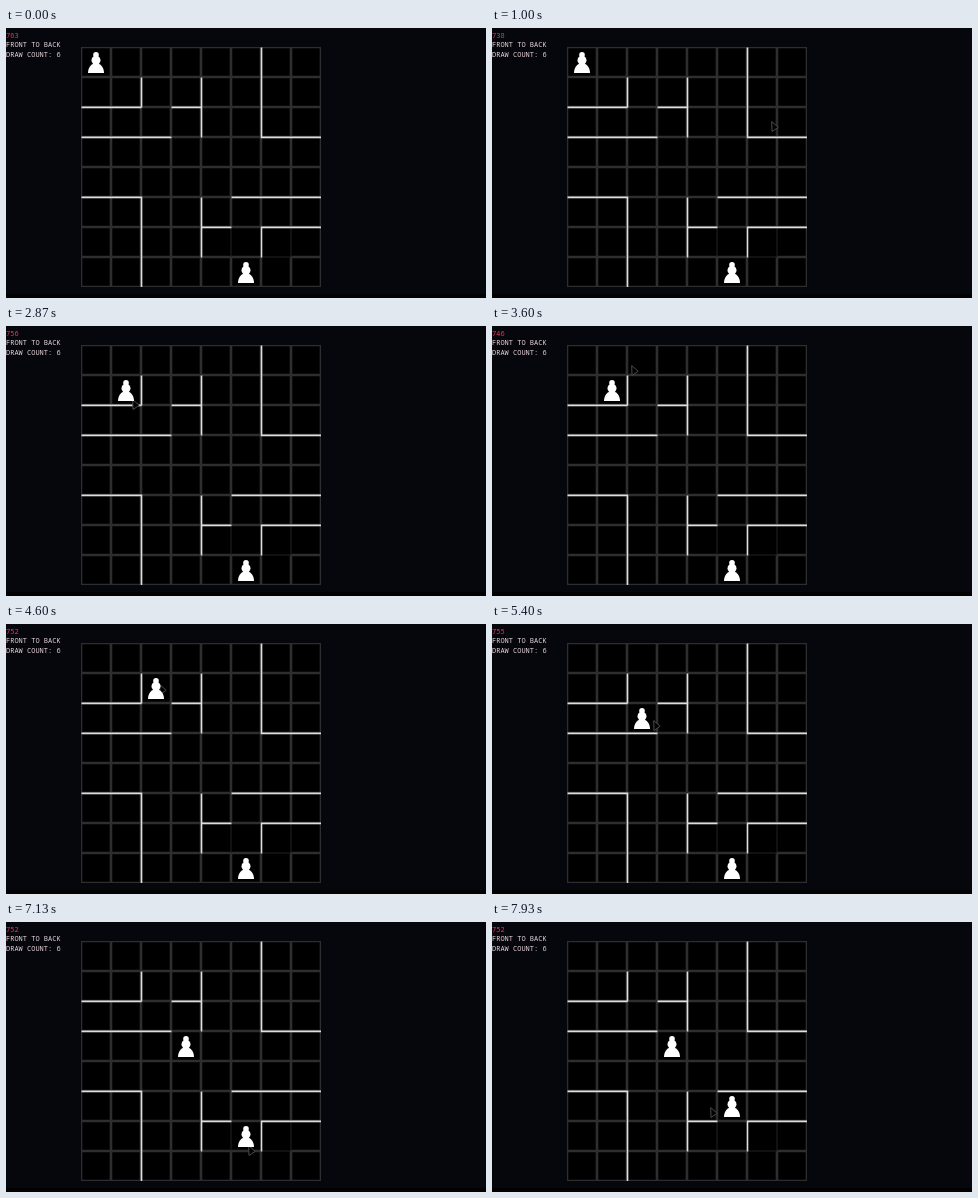
Write an HTML page that moves like this. It is 480x270 px and loops after 8000 ms.

```html
<!DOCTYPE html>
<html lang="en">
<head>
<meta charset="utf-8">
<title>Board</title>
<style>
  html, body { margin: 0; width: 100%; height: 100%; overflow: hidden; background: #06070c; }
  svg { display: block; width: 480px; height: 270px; }
  text { font: 500 7px "Noto Sans Mono", "DejaVu Sans Mono", monospace; fill: #e6d3d9; white-space: pre; }
  #count { fill: #f5305f; }
  path { vector-effect: non-scaling-stroke; }
  .line { stroke: #2e2e2e; stroke-width: 2.6; fill: none; }
  .thin { stroke: #222; stroke-width: 1; fill: none; }
  .wall { stroke: #dedede; stroke-width: 1.6; fill: none; }
  #cursor { fill: #000; stroke: #4c4c4c; stroke-width: 1; stroke-linejoin: round; }
  .pawn { fill: #fff; }
</style>
</head>
<body>
<svg viewBox="0 0 480 270">
  <defs>
    <clipPath id="board"><rect x="75" y="19" width="240" height="240"/></clipPath>
    <g id="pawn">
      <circle cy="-7.6" r="2.8"/>
      <circle cy="-2.3" r="4.5"/>
      <path d="M-8 10.5C-8 5.2-5 2-2.8 1.2H2.8C5 2 8 5.2 8 10.5Z"/>
    </g>
  </defs>
  <rect width="480" height="270" fill="#06070c"/>
  <rect y="266" width="480" height="4" fill="#010102"/>
  <g clip-path="url(#board)">
    <rect x="75" y="19" width="240" height="240"/>
    <g transform="translate(75 19) scale(30)">
      <path class="line" id="grid"/>
      <path class="thin" id="thin"/>
    </g>
    <path class="wall" transform="translate(75.5 19.4) scale(30)"
      d="M2 1v1M4 1v2M6 0v3h2M2 8v-3h-2M4 5v2M6 7v-1h2M0 2h2M3 2h1M0 3h3M5 5h3M4 6h1"/>
  </g>
  <path id="cursor" d="M.7.6L7.2 6.3L1 10.5Z"/>
  <use href="#pawn" class="pawn" id="first"/>
  <use href="#pawn" class="pawn" id="second"/>
  <text id="count" y="10.3"></text>
  <text y="18.9">FRONT TO BACK</text>
  <text y="29.1">DRAW COUNT: 6</text>
</svg>
<script>
const LOOP = 8000, CELL = 30;
const $ = id => document.getElementById(id);

// A few lines beside the lower right cells are faint
let lines = '', thin = '';
for (let i = 0; i <= 8; i++) {
  for (let k = 0; k < 8; k++) {
    const down = `M${i} ${k}v1`, across = `M${k} ${i}h1`;
    if (k === 6 && i > 4 && i < 8) thin += down; else lines += down;
    if (k === 6 && i === 7) thin += across; else lines += across;
  }
}
$('grid').setAttribute('d', lines);
$('thin').setAttribute('d', thin);

// One reading per second
const counts = [763, 738, 726, 756, 746, 752, 755, 755, 752];

// time, column, row
const firstMoves = [[0, 0, 0], [1660, 1, 1], [4060, 2, 1], [4860, 2, 2], [5530, 3, 3]];
const secondMoves = [[0, 5, 7], [6930, 5, 6], [7330, 5, 5]];

// Cursor strokes: start, end, x, y
const strokes = [
  [600, 1400, 86, 34], [1600, 1800, 116, 63], [2000, 2270, 126, 64],
  [2400, 2670, 120, 23], [2670, 2930, 127, 81], [3070, 3200, 162, 88],
  [3200, 3600, 139, 39], [3600, 4000, 148, 57], [4130, 4600, 153, 60],
  [4600, 4930, 155, 88], [5200, 6070, 199, 151], [6070, 6270, 264, 255],
  [6400, 6530, 242, 246], [6730, 7600, 241, 193], [7670, 7930, 218, 185]
];

const ease = p => p * p * (3 - 2 * p);

function cursorAt(t) {
  let x = 472, y = 152;
  for (const [from, to, nx, ny] of strokes) {
    const p = ease(Math.min(1, Math.max(0, (t - from) / (to - from))));
    x += (nx - x) * p;
    y += (ny - y) * p;
  }
  return [Math.round(x), Math.round(y)];
}

const place = (id, x, y) => $(id).setAttribute('transform', `translate(${x} ${y})`);

function placePawn(id, moves, t) {
  const [, col, row] = moves.filter(m => m[0] <= t).pop();
  place(id, 90 + col * CELL, 34.5 + row * CELL);
}

function draw(now) {
  // Fifteen pictures a second, on times rounded to 10 ms
  const step = Math.floor((now % LOOP + 3.4) * 0.015);
  const t = Math.round(step / 0.15) * 10;
  $('count').textContent = counts[Math.floor((t + 870) / 1000)];
  placePawn('first', firstMoves, t);
  placePawn('second', secondMoves, t);
  $('cursor').setAttribute('visibility', t < 600 ? 'hidden' : 'visible');
  place('cursor', ...cursorAt(t));
}

const start = performance.now();
function tick() {
  draw(performance.now() - start);
  requestAnimationFrame(tick);
}
tick();
</script>
</body>
</html>
```
